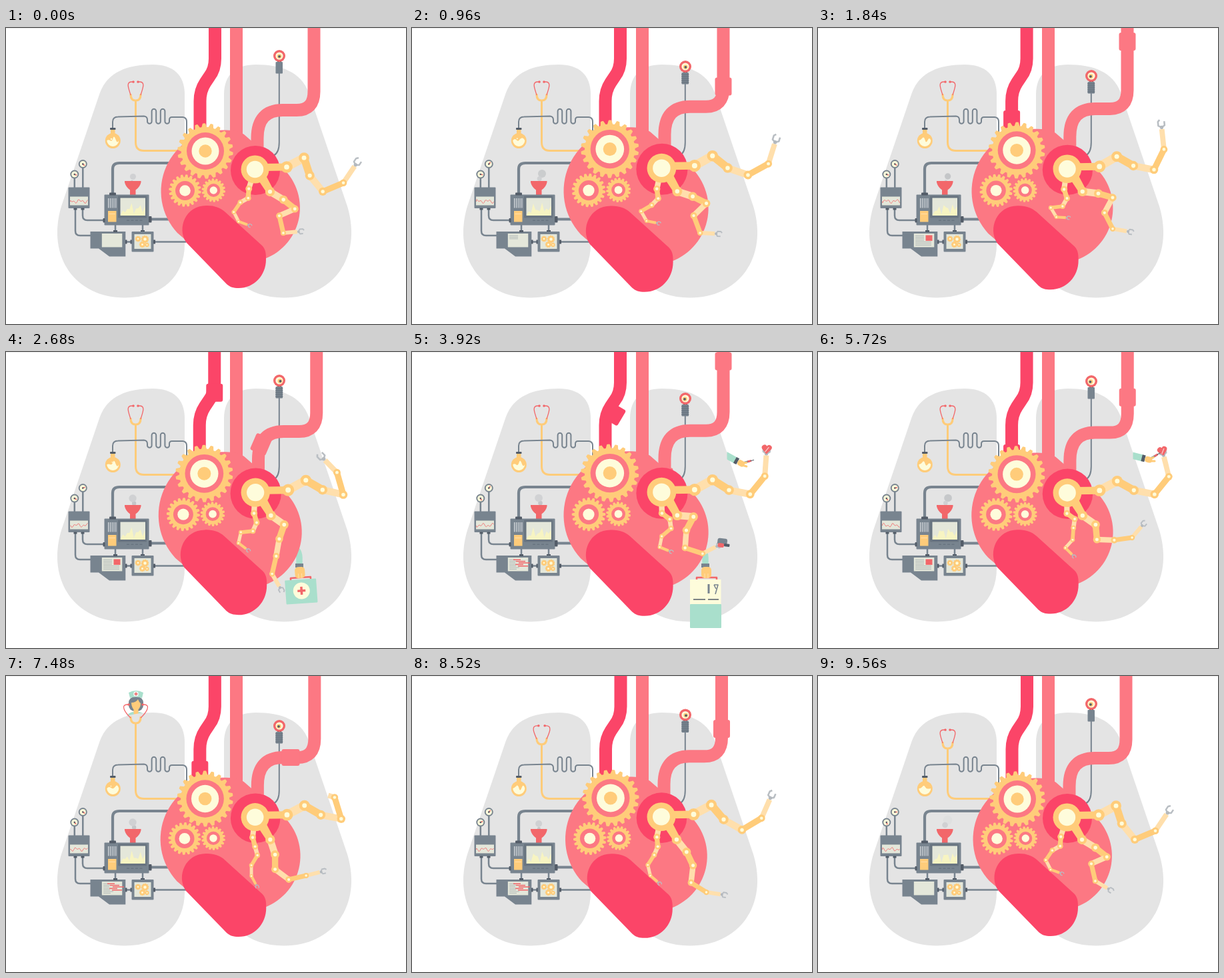
Write an HTML page with a canvas that moves like this. It is 600 px wide and 445 px high and loops after 9.6 s.

```html
<!DOCTYPE html>
<html lang="en">
<head>
<meta charset="utf-8">
<title>Heart machine</title>
<style>
html, body { margin: 0; width: 100%; height: 100%; overflow: hidden; background: #fff; }
canvas { display: block; width: 600px; height: 445px; }
</style>
</head>
<body>
<canvas id="stage"></canvas>
<script>
const LOOP = 9600, W = 600, H = 445;
const PINK = '#fc7883', RED = '#fb4568', CORAL = '#f2676a', GOLD = '#ffcc7a', PALE = '#ffdfac',
  CREAM = '#fefcdb', LUNG = '#e4e4e4', SLATE = '#78848f', DARK = '#535c68', MINT = '#a9dfcc', SCREEN = '#e4e7da';

const canvas = document.getElementById('stage');
const g = canvas.getContext('2d');
const dpr = window.devicePixelRatio || 1;
canvas.width = W * dpr;
canvas.height = H * dpr;

// drawing helpers
const shape = (d, color) => { g.fillStyle = color; g.fill(new Path2D(d)); };
const line = (d, color, w, cap = 'butt') => {
  g.strokeStyle = color; g.lineWidth = w; g.lineCap = cap; g.lineJoin = 'round';
  g.stroke(new Path2D(d));
};
const disc = (x, y, r, color) => {
  g.fillStyle = color; g.beginPath(); g.arc(x, y, Math.max(0, r), 0, 7); g.fill();
};
const box = (x, y, w, h, color, r = 0) => {
  g.fillStyle = color; g.beginPath(); g.roundRect(x, y, w, h, r); g.fill();
};
const at = (x, y, deg, draw) => {
  g.save(); g.translate(x, y); g.rotate(deg * Math.PI / 180); draw(); g.restore();
};
const cross = (x, y, r, w) => {
  box(x - r, y - w / 2, 2 * r, w, CORAL);
  box(x - w / 2, y - r, w, 2 * r, CORAL);
};

// eased interpolation; values are numbers or arrays
const mix = (a, b, k) => Array.isArray(a) ? a.map((v, i) => v + (b[i] - v) * k) : a + (b - a) * k;
function keys(t, times, values) {
  if (t <= times[0]) return values[0];
  for (let i = 1; i < times.length; i++) {
    if (t < times[i]) {
      const k = (t - times[i - 1]) / (times[i] - times[i - 1]);
      return mix(values[i - 1], values[i], k * k * (3 - 2 * k));
    }
  }
  return values[values.length - 1];
}
const visit = (t, a, b, c, d) => keys(t, [a, b, c, d], [0, 1, 1, 0]);

const POSES = [0, 1840, 2680, 3920, 5720, 7480, 9560];
const BIG_TIMES = [0, 750, 1840, 2680, 3920, 4700, 5720, 6450, 7480, 8600, 9560];
// link angles in degrees, last entry is the length of the final link
const BIG = [
  [-28, 72, 51, -23, -56, 30], [-29, 40, 20, -25, -70, 30], [-30, 29, 11, -64, -96, 30],
  [-29, 30, 13, -106, -134, 25], [-29, 32, 11, -51, -86, 30], [-29, 31, 11, -48, -84, 30],
  [-28, 29, 11, -51, -104, 30], [-28, 30, 11, -48, -82, 30], [-28, 30, 11, -107, -163, 10],
  [-28, 50, 30, -30, -65, 30], [-28, 72, 51, -23, -56, 30]];
const MID = [
  [31, 39, 156, 77, -5], [7, 16, 118, 63, 10], [35, 109, 100, 103, 60], [5, 118, 94, 18, -27],
  [35, 85, 2, -8, -50], [72, 90, 37, -13, -14], [31, 39, 156, 77, 31]];
const SMALL = [
  [107, 94, 151, 124, 63, 20], [98, 72, 119, 173, 59, 4], [93, 74, 114, 174, 103, 37],
  [88, 37, 82, 140, 101, 22], [90, 35, 98, 94, 132, 45], [96, 75, 75, 121, 90, 62],
  [107, 94, 151, 124, 63, 20]];

// double beat
const beat = t => keys(t * 13 / LOOP % 1,
  [0, .129, .308, .37, .49, .63, .746, .946, 1], [0, .17, 1, 1.45, .4, .75, .45, 0, 0]);

function nurse(p) {
  if (!p) return;
  at(195, 48 * (1 - p), 0, () => {
    shape('M-14 70V62Q-12 55 -5 54H5Q12 55 14 62V70Z', MINT);
    box(-11, 31, 22, 22, SLATE, 9);
    box(-3.5, 46, 7, 13, GOLD, 3);
    shape('M-7 40Q0 40 3 35Q5 40 7 41Q7 49 0 53Q-7 49 -7 40Z', GOLD);
    shape('M-9 33L-11 25Q0 19 11 25L9 33Q0 30 -9 33Z', MINT);
    disc(0, 27, 4, '#e8f5ee');
    cross(0, 27, 2.5, 1.6);
  });
}

function lungs() {
  const d = 'M268 100C268 70 250 55 220 55C182 55 153 66 141 97L83 268C60 345 105 405.500 178 405.500C235 405.500 268 372 268 325Z';
  shape(d, LUNG);
  g.save(); g.translate(595, 0); g.scale(-1, 1); shape(d, LUNG); g.restore();
}

function stethoscope(p) {
  const y = -38 * p, e = 8 + 7 * p;
  line(`M194.500 ${109 + y}V172Q194.500 184.500 207 184.500H262`, GOLD, 3);
  line(`M187 ${100 + y}Q187 ${109 + y} 194.500 ${109 + y}T202 ${100 + y}`, GOLD, 3.2, 'round');
  for (const k of [-1, 1]) {
    const x = v => 194.5 + k * v;
    line(`M${x(e - 5)} ${81 + y}L${x(e - 1)} ${81 + y}C${x(e + 7)} ${82 + y} ${x(e + 2)} ${92 + y} ${x(7.5)} ${101 + y}`, CORAL, 1.3);
    disc(x(e - 4.5), 81 + y, 1.8, CORAL);
  }
}

function flask(t) {
  line('M160 152V141Q160 133.500 168 133.500L207 132.500Q212 133 212 138V140.500a3.300 3.300 0 0 0 6.600 0V125a3.300 3.300 0 0 1 6.600 0'
    + 'V140.500a3.300 3.300 0 0 0 6.600 0V125a3.300 3.300 0 0 1 6.600 0V140.500a3.300 3.300 0 0 0 6.600 0V138'
    + 'Q245 134 249 134H265Q271 134.500 271 141V166', SLATE, 2);
  box(157, 151, 6.5, 9, GOLD);
  box(156, 150, 8.500, 3, DARK, 1);
  disc(160.300, 169.500, 11.500, GOLD);
  const wave = k => 167.5 + 2 * Math.sin(t / 210 + k * 2.1);
  shape(`M151.300 169Q154 ${wave(0)} 156.500 ${wave(1)}T160.500 ${wave(2)}T164.500 ${wave(3)}T169.300 169A9 9 0 0 1 151.300 169Z`, CREAM);
  const b = t / 800 % 1;
  disc(158 + 3 * Math.sin(t / 300), 167 - 4 * b, 1.3 * (1 - b), CREAM);
}

function gauge(x, y, a) {
  disc(x, y, 6.5, SLATE);
  disc(x, y, 4.6, CREAM);
  at(x, y, a, () => { line('M-1 0H3.500', CORAL, 1.6); disc(0, 0, 1.3, DARK); });
}

function monitor(t) {
  line('M102.800 226V241M115.300 210V241', SLATE, 2.5);
  gauge(102.800, 220, 20 + 50 * Math.sin(t / 290));
  gauge(115.300, 204.500, 50 * Math.sin(t / 240 + 1));
  line('M104 272V305Q104 312 111 312H128M115 272V282Q115 289 122 289H148', SLATE, 2.5);
  box(93.500, 239.500, 32, 31.500, SLATE, 1);
  box(101.500, 270.500, 5, 3, DARK);
  box(112.500, 270.500, 5, 3, DARK);
  box(96, 253.500, 27, 13, SCREEN);
  let d = 'M96.500 261';
  for (let x = 97; x < 123; x += 1.6) {
    const u = x / 4 + t / 320;
    d += `L${x} ${260.5 + 3.4 * Math.sin(u) * Math.sin(u * 2.7)}`;
  }
  line(d, CORAL, .8);
}

function smoke(t) {
  for (let i = 0; i < 2; i++) {
    const k = (t / 1200 + i / 2) % 1;
    g.globalAlpha = Math.min(1, 4 - 4 * k);
    disc(189 + 3 * Math.sin(i * 2 + k * 3) + 5 * k, 231 - 15 * k, 2 + 5 * k, i % 2 ? '#d0d1d3' : '#c4c6c8');
  }
  g.globalAlpha = 1;
}

function analyser(t) {
  line('M160 252V212Q160 203 170 203H250', SLATE, 4.200);
  line('M212 287.500H250', SLATE, 4);
  line('M164 295V308M205 295V308', SLATE, 2.5);
  smoke(t);
  shape('M178 230H202.500V232Q201 239 194.500 243.500V252H186V243.500Q179.500 239 178 232Z', CORAL);
  box(147.500, 250.500, 67, 46, SLATE, 1);
  box(155, 247.500, 10, 4, DARK, 1);
  box(214, 283, 4.500, 9.500, DARK, 1);
  box(145.500, 286, 3, 6.500, DARK, 1);
  for (let i = 0; i < 5; i++) box(153 + i * 2.8, 256, 1.2, 14.500, '#d9dde0');
  box(153, 275, 12.500, 16.500, GOLD);
  box(154.500, 279, 9.500, 1, PALE);
  box(168, 252.500, 43, 33, '#687480', 1);
  box(171.500, 255.500, 37.500, 26.500, SCREEN);
  let d = 'M172 282';
  for (let i = 0; i < 12; i++) {
    const h = 5 + (i % 2 ? 9 : 2) + 6 * Math.sin(i * 1.7 + t / 420) * Math.sin(i / 3.6);
    d += `L${172 + i * 3.3} ${282 - h * Math.min(1, (i + 1) / 4)}`;
  }
  shape(d + 'L208.500 282Z', '#f7f4c2');
  for (let i = 0; i < 4; i++) box(181 + i * 6.5, 288.500, 4, 1.5, '#687480');
}

function printer(t) {
  line('M178 321.500H192M220 321.500H270', SLATE, 2.5);
  shape('M126.500 306H179.300V343.500H155L139 331.500H126.500Z', SLATE);
  box(161, 304, 6, 3, DARK);
  box(202, 304, 6, 3, DARK);
  box(179, 318.500, 2.500, 6, DARK);
  box(186.500, 318.500, 2.500, 6, DARK);
  box(143.800, 309, 30.500, 20.500, SCREEN);
  const start = [700, 3000, 4800, 6600, 8900].filter(v => v <= t);
  const page = start.length;
  if (page && page < 5) {
    const shown = Math.min(7, (t - start[page - 1]) / 120);
    for (let i = 0; i < shown; i++) {
      const y = 311.500 + i * 2.4;
      if (page % 2) box(146, y, i > 3 ? 24 : 13, 1, '#aeb6b5');
      else {
        box(146, y, 8 + i * 5 % 9, 1, '#aeb6b5');
        if (i < 5) box(152 + i * 4 % 9, y, 11 + i * 3 % 8, 1.5, CORAL);
      }
    }
    if (page % 2 && shown > 3) box(161.500, 311.500, 10, 8.500, CORAL);
  }
}

function gear(x, y, outer, root, n, a, holes) {
  g.beginPath();
  for (let i = 0; i < n; i++) {
    [[0, root], [.2, outer], [.45, outer], [.65, root]].forEach(([f, r]) => {
      const u = a + (i + f) / n * 2 * Math.PI;
      g.lineTo(x + r * Math.cos(u), y + r * Math.sin(u));
    });
  }
  g.closePath();
  g.fillStyle = g.strokeStyle = GOLD;
  g.lineWidth = 1.5; g.lineJoin = 'round';
  g.fill(); g.stroke();
  holes.forEach(([r, color]) => disc(x, y, r, color));
}

function gearScreen(turn) {
  box(188.500, 306, 33, 30.500, SLATE, 1);
  box(221, 318.500, 3, 6, DARK);
  box(192.500, 310, 25, 22, SCREEN);
  gear(208.500, 317.500, 5, 4, 10, turn * 3, [[2.2, CREAM]]);
  gear(198, 317, 3.700, 2.800, 9, -turn * 4, [[1.3, CREAM]]);
  gear(204.500, 325.500, 4, 3, 9, -turn * 4, [[1.5, CREAM]]);
  gear(211.500, 326, 2.600, 1.800, 8, turn * 5, [[1, CREAM]]);
}

function periscope(t) {
  const y = keys(t, POSES, [42, 72, 43, 70, 44, 75, 42]);
  line(`M409.800 ${y + 20}V172Q409.800 188 401 192`, SLATE, 2);
  box(407, y + 7, 6, 4, DARK);
  box(404.500, y + 9, 10.500, 17.500, SLATE, 1);
  const coiled = (t > 500 && t < 4700) || (t > 6300 && t < 9100);
  if (coiled) for (let i = 0; i < 5; i++) box(404, y + 11.500 + i * 3, 11.500, .9, '#616b76');
  disc(410, y, 9, CORAL);
  disc(410, y, 5.600, CREAM);
  const look = Math.sin(t / 330);
  disc(410 + look, y + .6, 3.4, GOLD);
  disc(410 + 1.6 * look, y + .8, 1.9, DARK);
}

function medkit(t) {
  const p = visit(t, 2150, 2600, 4500, 4950);
  if (!p) return;
  const q = visit(t, 2850, 3250, 4080, 4450);
  at(-85 * (1 - p), -25 * (1 - p), 0, () => {
    line('M422 294Q440 292 440 310V320', MINT, 9.500);
    box(434, 318, 12, 6, SLATE);
    at(442, 341, -4 * (1 - q), () => {
      line('M-15 2V-2H15V2', CORAL, 2.5);
      box(-8, -18, 15, 17, GOLD, 5);
      line('M-3 -8V-1M2 -8V-1', PALE, 1);
      if (q) {
        box(-25, 1, 46.500, 38 * q, CREAM);
        if (q > .7) {
          line('M3 8V22', SLATE, 3);
          line('M11 9H17L13 23M11 9L14 15', SLATE, 1.6);
          line('M-20 31H-2M2 31H18', DARK, 1.6);
        }
      }
      box(-24 - q, 1 + 37 * q, 47, 36, MINT, 1);
      g.globalAlpha = 1 - q;
      disc(0, 18, 12.5, CREAM);
      cross(0, 18, 6, 3.5);
      g.globalAlpha = 1;
    });
  });
}

// a tube with lumps travelling down it along the given route
const track = document.createElementNS('http://www.w3.org/2000/svg', 'path');
function pipe(d, color, t, starts, route = d) {
  line(d, color, 19);
  track.setAttribute('d', route);
  const end = track.getTotalLength();
  starts.forEach(start => {
    const l = 20 + (t - start) * .214;
    if (l < 2 || l > end) return;
    const a = track.getPointAtLength(l - 2), b = track.getPointAtLength(l + 2);
    const deg = Math.atan2(b.y - a.y, b.x - a.x) * 180 / Math.PI;
    at((a.x + b.x) / 2, (a.y + b.y) / 2, deg, () => box(-13.5, -12.5, 27, 25, color, 3));
  });
}

function pipes(t, s) {
  const x = -s;
  pipe(`M${313.5 + x} -20V46Q${313.5 + x} 62 ${305 + x} 73L${299 + x} 82Q${291 + x} 94 ${291 + x} 110V176`, RED, t,
    [150, 1176, 2395, 3476, 4986, 5900, 6798, 7750, 8650],
    `M${313.5 + x} -20V62C${313.5 + x} 96 ${291 + x} 100 ${291 + x} 130V176`);
  box(336, 0, 19, 175, PINK);
  const r = 462 + 5 * s, h = 123.5 - 5.3 * s, l = 377 + 2 * s;
  pipe(`M${r} -20V${h - 28}Q${r} ${h} ${r - 26} ${h}H${l + 38}Q${l} ${h} ${l} ${h + 42}V200`, PINK, t,
    [550, 1745, 2750, 3855, 5402, 6788, 8150]);
}

function claw(k) {
  g.save(); g.scale(k, k);
  line('M0 0H2M2 0L4 -3.500L8.500 -3.500L10.500 -1.500M2 0L4 3.500L8.500 3.500', '#b9bec3', 1.9);
  disc(2, 0, 2, '#b4b9be');
  g.restore();
}

// draws a jointed arm and whatever its claw holds
function arm(x, y, angles, lengths, w0, w1, held) {
  const n = angles.length, pts = [[x, y]];
  angles.forEach((deg, i) => {
    const a = deg * Math.PI / 180;
    x += lengths[i] * Math.cos(a); y += lengths[i] * Math.sin(a);
    pts.push([x, y]);
  });
  const size = i => w0 + (w1 - w0) * i / n;
  if (lengths[n - 1] > 12) at(x, y, angles[n - 1], () => { claw(w1 / 6); held && held(); });
  for (let i = 0; i < n; i++) {
    const [ax, ay] = pts[i], [bx, by] = pts[i + 1];
    line(`M${ax} ${ay}L${bx} ${by}`, i % 2 ? GOLD : PALE, size(i) * .8);
  }
  for (let i = 0; i < n; i++) {
    disc(...pts[i], size(i) * .55, GOLD);
    disc(...pts[i], size(i) * .24, CREAM);
  }
}

function heart(t, s, turn) {
  shape('M257 308A92 92 0 0 1 325 153.500C340 153.500 349 154 357 160L411 207A82 82 0 0 1 388 347L300 345Z', PINK);
  shape('M270 322C256 300 270 267 300 267C312 266.500 321 270 328 276L384 327C390 333 390 340 390 348'
    + 'C390 372 372 391 349 391C341 391 336 389.500 331 385Z', RED);
  gear(299, 185, 41, 35.500, 22, turn, [[28, PINK], [20.500, CREAM], [9.700, GOLD]]);
  gear(268.500, 244.500, 23.500, 19.500, 20, -2 * turn, [[14.500, PINK], [8.300, CREAM]]);
  gear(311.300, 244, 17, 14, 18, 3 * turn, [[10, PINK], [5.700, CREAM]]);
  disc(374, 214, 37, RED);
}

function arms(t) {
  const small = keys(t, POSES, SMALL);
  arm(373, 213, small, [30, 14, 13.500, 17.500, 16, 14], 10, 4);
  shape('M378 228L392 249L401 243L390 222Z', GOLD);
  arm(396, 246, keys(t, POSES, MID), [23.500, 22, 25.500, 26.500, 21], 13, 6,
    t > 3000 && t < 4900 && (() => {
      at(10, -1, 34, () => { box(-6, -7, 14, 9, SLATE, 3); box(-5, 0, 9, 6, CORAL, 2); box(4, 0, 8, 4, DARK, 1); });
    }));
  shape('M386 204L421 203.500V214.500L386 215Z', GOLD);
  const big = keys(t, BIG_TIMES, BIG);
  arm(421, 209, big.slice(0, 5), [29.500, 28, 31, 33.500, big[5]], 16, 8,
    t > 2750 && t < 7250 && (() => {
      at(9, 0, 90, () => {
        shape('M0 7L-6.500 0A3.700 3.700 0 0 1 0 -4.500A3.700 3.700 0 0 1 6.500 0Z', CORAL);
        line('M-2 4L3 -3', '#fbd0cf', 1.2);
      });
    }));
  disc(373.500, 212.500, 21, GOLD);
  disc(373.500, 212.500, 12.700, CREAM);
}

function injector(t) {
  const p = visit(t, 3250, 3750, 6100, 6600);
  if (!p) return;
  g.save();
  g.beginPath(); g.rect(472.500, 100, 100, 120); g.clip();
  at(473, 156, keys(t, [3920, 4700, 5720], [29, 14, 14]), () => {
    g.translate(-48 * (1 - p), 0);
    line('M27 -3L33 -9', SLATE, 3);
    line('M31 -7L35 -11', CORAL, 3);
    line('M34 -10L38 -14', DARK, 1);
    box(-6, -5, 21, 10, MINT);
    box(13, -5, 5, 10, DARK);
    box(18, -4.500, 11, 9, GOLD, 4);
    line('M25 -1L30 -5M25 2L33 0', GOLD, 3, 'round');
  });
  g.restore();
}

function draw(t) {
  const s = beat(t), turn = t / LOOP * 2 * Math.PI, peek = visit(t, 6500, 7200, 8000, 8700);
  g.setTransform(dpr, 0, 0, dpr, 0, 0);
  box(0, 0, W, H, '#fff');
  box(0, 0, W, 1, '#f0f0f0');
  nurse(peek);
  lungs();
  stethoscope(peek);
  flask(t);
  monitor(t);
  analyser(t);
  printer(t);
  gearScreen(turn);
  periscope(t);
  medkit(t);
  pipes(t, s);
  g.save();
  const k = 1 + .042 * s;
  g.translate(352, 255); g.scale(k, k); g.translate(-352, -255);
  heart(t, s, turn);
  arms(t);
  g.restore();
  injector(t);
}

function tick() {
  draw(performance.now() % LOOP);
  requestAnimationFrame(tick);
}
tick();
</script>
</body>
</html>
```
